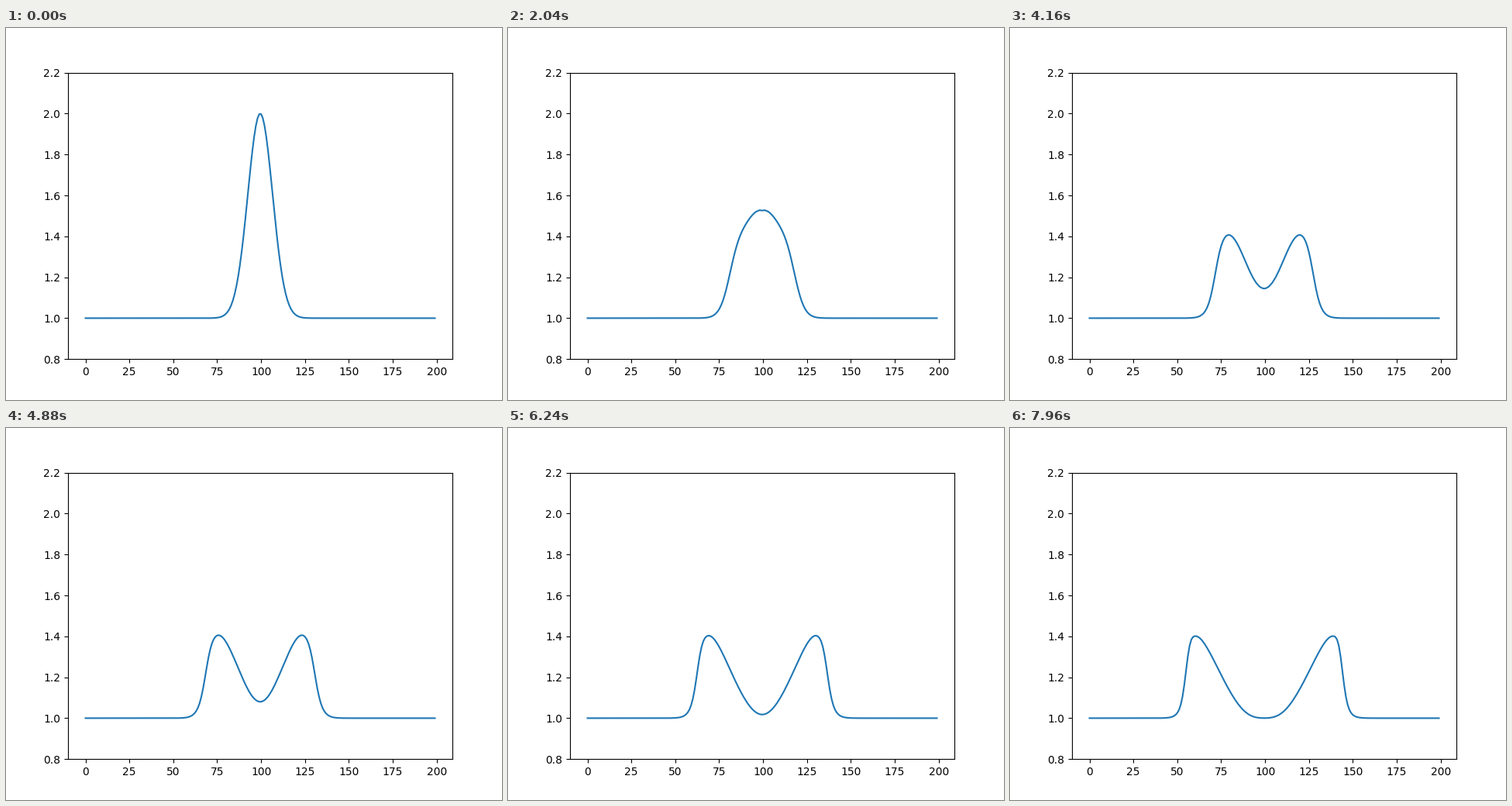
Write a matplotlib script that moves like this. It is 640x480 px and loops after 8 s.

```python
import numpy as np
import matplotlib.pyplot as plt
from matplotlib.animation import FuncAnimation

# Isothermal gas in a closed tube: a density bump splits into two shocks.
CELLS = 200
FRAMES = 200
INTERVAL = 40
CFL = 0.2
WIDTH = 0.05 * (CELLS - 1)


def advect(q, u, dt):
    """Donor-cell advection with velocities u on the inner cell faces."""
    flux = np.zeros(CELLS + 1)
    flux[1:-1] = u * np.where(u > 0, q[:-1], q[1:])
    return q - dt * np.diff(flux)


def step(rho, mom):
    """Advance by one time step; cell size and sound speed are 1."""
    vel = mom / rho
    dt = CFL / (1 + np.abs(vel).max())
    face = 0.5 * (vel[:-1] + vel[1:])
    rho = advect(rho, face, dt)
    mom = advect(mom, face, dt)
    wall = np.pad(rho, 1, mode="edge")
    mom = mom - 0.5 * dt * (wall[2:] - wall[:-2])
    return rho, mom


def simulate():
    x = np.arange(CELLS)
    rho = 1 + np.exp(-((x - x.mean()) / WIDTH) ** 2)
    mom = np.zeros(CELLS)
    history = []
    for _ in range(FRAMES):
        rho, mom = step(rho, mom)
        history.append(rho)
    return history


history = simulate()

fig, ax = plt.subplots(figsize=(6.4, 4.8), dpi=100)
line, = ax.plot(history[0])
ax.set_ylim(0.8, 2.2)


def update(i):
    line.set_ydata(history[i])
    return line,


anim = FuncAnimation(fig, update, frames=FRAMES, interval=INTERVAL,
                     repeat=True, repeat_delay=0)
plt.show()
```
